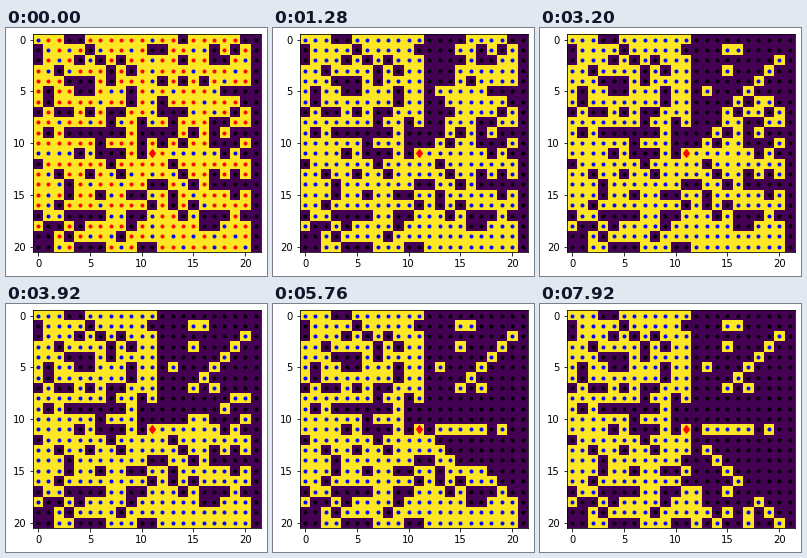
Recreate the animation shown at these times as a matplotlib script. Size 261 by 248 pixels, loop 8000 ms.

```python
import math

import matplotlib.pyplot as plt
import numpy as np
from matplotlib.animation import FuncAnimation

ASTEROIDS = """
###..#########.#####.
.####.#####..####.#.#
.###.#.#.#####.##..##
##.####.#.###########
###...#.####.#.#.####
#.##..###.########...
#.#######.##.#######.
.#..#.#..###...####.#
#######.##.##.###..##
#.#......#....#.#.#..
######.###.#.#.##...#
####.#...#.#######.#.
.######.#####.#######
##.##.##.#####.##.#.#
###.#######..##.#....
###.##.##..##.#####.#
##.########.#.#.#####
.##....##..###.#...#.
#..#.####.######..###
..#.####.############
..##...###..#########
""".split()
STATION = (11, 11)
DPI = 72
WIDTH, HEIGHT = 261, 248
FRAMES, INTERVAL = 100, 80

# One empty column closes the map on the right.
field = np.array([[c == "#" for c in row + "."] for row in ASTEROIDS])
rows, cols = field.shape


def first_targets():
    """Nearest asteroid in each direction, clockwise from straight up."""
    nearest = {}
    for y, x in np.argwhere(field):
        dx, dy = int(x) - STATION[0], int(y) - STATION[1]
        steps = math.gcd(dx, dy)
        if steps:
            key = (dx // steps, dy // steps)
            nearest[key] = min(nearest.get(key, (steps, x, y)), (steps, x, y))
    order = sorted(nearest, key=lambda d: math.atan2(d[0], -d[1]) % math.tau)
    return [nearest[d][1:] for d in order]


targets = first_targets()
visible = np.zeros_like(field)
for tx, ty in targets:
    visible[ty, tx] = True
visible[STATION[1], STATION[0]] = True

fig = plt.figure(figsize=(WIDTH / DPI, HEIGHT / DPI), dpi=DPI, facecolor="white")
ax_h = 217.44
ax_w = ax_h * cols / rows
ax = fig.add_axes([26.93 / WIDTH, 24.2 / HEIGHT, ax_w / WIDTH, ax_h / HEIGHT])
image = ax.imshow(field.astype(float), vmin=0, vmax=1, cmap="viridis",
                  interpolation="nearest", aspect="auto")
ax.set_xticks(range(0, cols, 5))
ax.set_yticks(range(0, rows, 5))
ax.tick_params(labelsize=10)


def dot_layer(color):
    return ax.plot([], [], ".", color=color, markersize=6)[0]


empty_dots, rock_dots, seen_dots = (dot_layer(c) for c in ("k", "b", "r"))
ax.plot(*STATION, "rd", markersize=6)
ax.set_xlim(-0.5, cols - 0.5)
ax.set_ylim(rows - 0.5, -0.5)


def place(layer, mask):
    y, x = np.nonzero(mask)
    layer.set_data(x, y)


def update(frame):
    state = field.copy()
    for x, y in targets[:frame]:
        state[y, x] = False
    # The line-of-sight colouring shows only before the first shot.
    seen = visible if frame == 0 else np.zeros_like(field)
    image.set_data(state.astype(float))
    place(empty_dots, ~state)
    place(rock_dots, state & ~seen)
    place(seen_dots, seen)
    return image, empty_dots, rock_dots, seen_dots


anim = FuncAnimation(fig, update, frames=FRAMES, interval=INTERVAL,
                     repeat=True, repeat_delay=0, blit=False)
plt.show()
```
